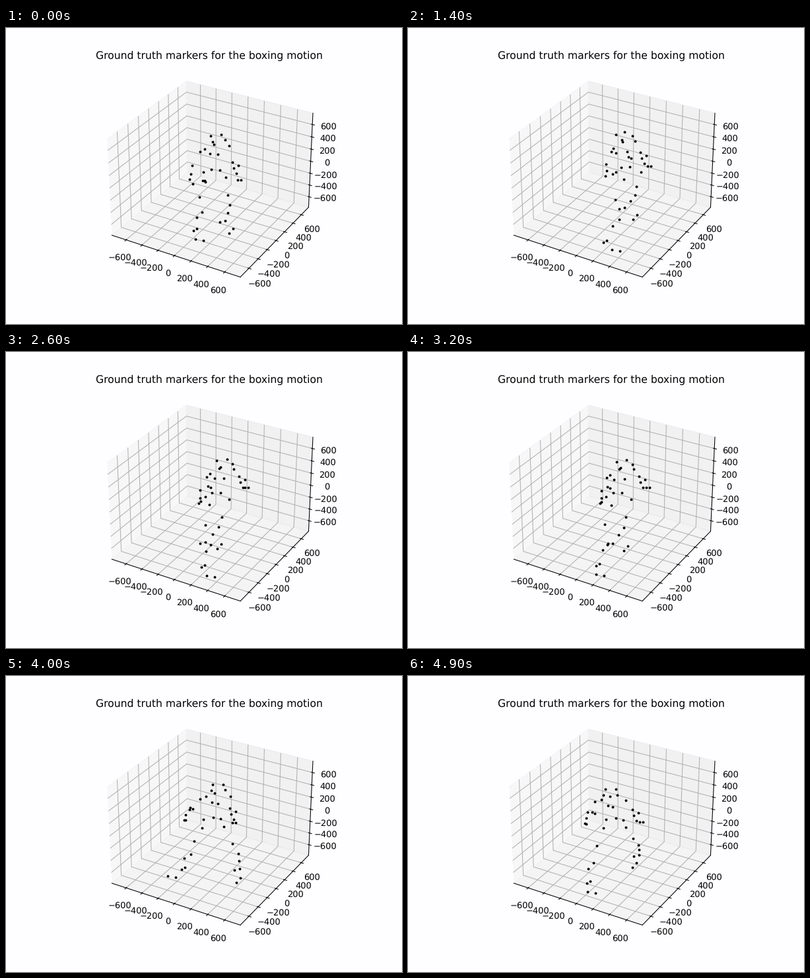
Animation, 600 px wide and 450 px high, one loop 5 s. Source, as a matplotlib script:

```python
import numpy as np
import matplotlib.pyplot as plt
from matplotlib.animation import FuncAnimation

W, H, DPI = 600, 450, 93.75
FRAMES, INTERVAL = 50, 100
PAPER = "#fefdff"
LIMIT = 750 * 25 / 24

# The boxer is steered by a few joints in stage pixels; all markers hang on them.
# Poses: guard, punch, recoil, rest, wide step, lean.
KEY_TIMES = np.array([6, 14, 21, 32, 40, 49])
TURN = [0, 22, 7, 12, -12, -16]
HEAD = [(320, 168), (327, 164), (332, 167), (327, 170), (321, 170), (306, 177)]
HIPS = [(314, 221), (332, 217), (319, 220), (317, 220), (313, 221), (313, 222)]
ELBOW = [(279, 226), (300, 221), (294, 225), (292, 226), (271, 215), (269, 220)]
LEFT_FIST = [(300, 233), (336, 197), (312, 203), (304, 206), (281, 201), (281, 208)]
RIGHT_FIST = [(353, 231), (365, 210), (365, 206), (363, 206), (345, 223), (353, 222)]
LEFT_HEEL = [(283, 306), (298, 324), (304, 326), (287, 323), (268, 292), (273, 313)]
LEFT_TOE = [(289, 322), (315, 338), (317, 341), (291, 339), (251, 305), (278, 329)]
RIGHT_HEEL = [(324, 294), (324, 274), (296, 287), (306, 292), (350, 294), (346, 273)]
RIGHT_TOE = [(337, 308), (344, 287), (320, 294), (330, 298), (352, 310), (343, 287)]


def glide(keys, frame):
    """Smooth path through the key poses without overshoot, held before the first."""
    keys = np.asarray(keys, dtype=float)
    spans = np.diff(KEY_TIMES)
    rate = (np.diff(keys, axis=0).T / spans).T
    product, total = rate[:-1] * rate[1:], rate[:-1] + rate[1:]
    onward = product > 0
    inner = np.where(onward, 2 * product / np.where(onward, total, 1), 0)
    slope = np.concatenate([0 * rate[:1], inner, rate[-1:]])

    frame = max(frame, KEY_TIMES[0])
    i = min(np.searchsorted(KEY_TIMES, frame, side="right") - 1, len(spans) - 1)
    u = (frame - KEY_TIMES[i]) / spans[i]
    blend = u * u * (3 - 2 * u)
    return (keys[i] + blend * (keys[i + 1] - keys[i])
            + spans[i] * u * (1 - u) * ((1 - u) * slope[i] - u * slope[i + 1]))


def ring(center, turn, radius, angle, height=0):
    """Point on a level circle around the spine, seen from above at 30 degrees."""
    a = np.radians(angle + turn)
    return center + np.array([radius * np.cos(a), height - radius * np.sin(a) / 2])


def along(start, end, t, dx=0, dy=0):
    return start + t * (end - start) + np.array([dx, dy])


def pair(center, dx, dy):
    """Two markers on either side of a joint."""
    return [along(center, center, 0, side * dx, side * dy) for side in (-1, 1)]


def markers_at(frame):
    turn = glide(TURN, frame)
    head, hips, elbow = (glide(keys, frame) for keys in (HEAD, HIPS, ELBOW))
    left_fist, right_fist = glide(LEFT_FIST, frame), glide(RIGHT_FIST, frame)
    slide = np.array([0.6 * max(KEY_TIMES[0] - frame, 0), 0])
    left_heel, left_toe, right_heel, right_toe = (
        glide(keys, frame) + slide
        for keys in (LEFT_HEEL, LEFT_TOE, RIGHT_HEEL, RIGHT_TOE))

    chest = along(head, hips, 0.3)
    left_shoulder = ring(chest, turn, 25, 193, 1)
    right_shoulder = ring(chest, turn, 22, 25)
    left_hip = ring(hips, turn, 21, -127, 3)
    right_hip = ring(hips, turn, 21, -22, 2)

    skull = [ring(head, turn, 13, angle) for angle in (140, 62, -18, -125)]
    trunk = [left_shoulder, right_shoulder, left_hip, right_hip,
             ring(chest, turn, 18, 165, 2), ring(chest, turn, 16, 125, 14),
             ring(chest, turn, 4, -40, 7), ring(chest, turn, 4, 140, -6)]
    waist = [ring(hips, turn, 17, angle, 2) for angle in (155, 100, 55)]

    left_arm = [along(left_shoulder, elbow, 0.5, -4, 2),
                along(elbow, left_fist, 0.35, -3, 9),
                *pair(elbow, 1, -4), *pair(left_fist, 2, 1)]
    right_arm = [along(right_shoulder, right_fist, 0.6, dx, dy)
                 for dx, dy in ((-4, -6), (5, -1), (-2, 3), (2, 11))]
    right_arm += pair(right_fist, 2.5, 0)

    bend = 5 + 0.3 * turn
    left_leg = [along(left_hip, left_heel, t, dx)
                for t, dx in ((0.33, -3), (0.65, bend), (0.76, bend - 6))]
    left_leg += pair(left_heel, 2.5, -1.5) + pair(left_toe, 6, 1)
    right_leg = [along(right_hip, right_heel, t, dx)
                 for t, dx in ((0.4, 5), (0.63, 9), (0.8, 7))]
    right_leg += pair(right_heel, 4, -1) + pair(right_toe, 3, -3.5)

    return np.array(skull + trunk + waist + left_arm + right_arm + left_leg + right_leg)


plt.rcParams["text.hinting"] = "none"
fig = plt.figure(figsize=(W / DPI, H / DPI), dpi=DPI, facecolor=PAPER)
room = fig.add_subplot(projection="3d", facecolor=PAPER)
ticks = range(-600, 601, 200)
span = (-LIMIT, LIMIT)
room.set(xlim=span, ylim=span, zlim=span, xticks=ticks, yticks=ticks, zticks=ticks)
room.set_title("Ground truth markers for the boxing motion")

stage = fig.add_axes([0, 0, 1, 1])
stage.set(xlim=(0, W), ylim=(H, 0))
stage.axis("off")
dots, = stage.plot([], [], "ko", markersize=3, markeredgewidth=0)


def update(frame):
    dots.set_data(*markers_at(frame).T)
    return dots,


anim = FuncAnimation(fig, update, frames=FRAMES, interval=INTERVAL,
                     repeat=True, repeat_delay=0)
plt.show()
```
